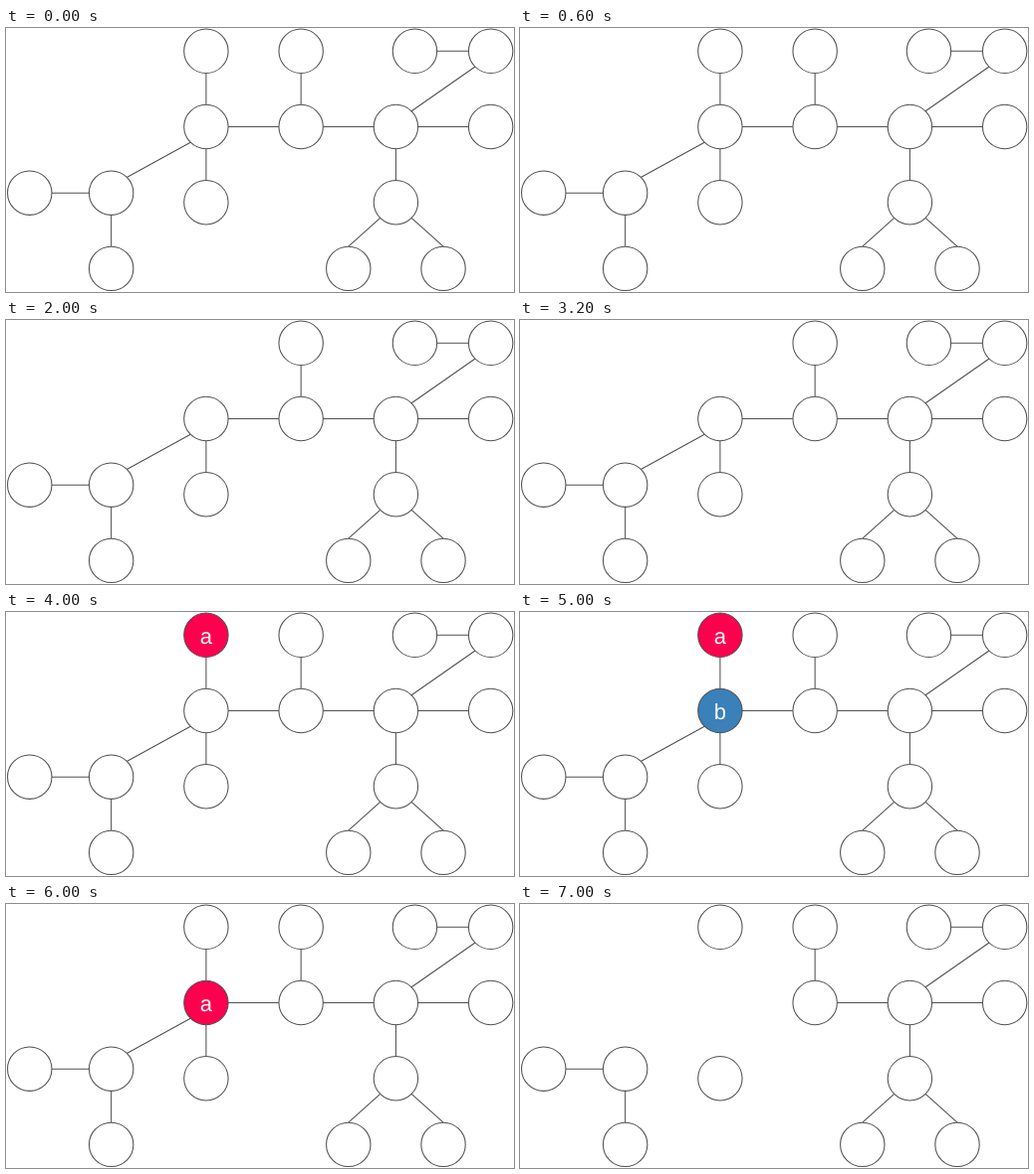
An HTML page for the animation above (8000 ms loop, 510 px wide and 266 px high).

```html
<!DOCTYPE html>
<html lang="en">
<head>
<meta charset="utf-8">
<title>Removing vertices from a tree</title>
<style>
  html, body { margin: 0; width: 100%; height: 100%; overflow: hidden; background: #fff; }
  svg { display: block; width: 510px; height: 266px; }
  circle, line { fill: #fff; stroke: #505050; stroke-width: 1.05; }
  text {
    font: 22px "Liberation Sans", Arial, sans-serif;
    fill: #fff; text-anchor: middle; text-rendering: geometricPrecision;
  }
</style>
</head>
<body>
<svg viewBox="0 0 510 266"></svg>
<script>
const R = 22.2, UNIT = 9.525, LOOP = 8000;

// A node sits a few grid units right of and below its parent.
const node = (dx, dy, ...children) => ({ dx, dy, children });
const leaf = node(0, -8);
const hub = node(0, 0,
  leaf,
  node(0, 8),
  node(-10, 7, node(-8.6, 0), node(0, 8)),
  node(10, 0,
    node(0, -8),
    node(10, 0,
      node(10, 0),
      node(10, -8, node(-8, 0)),
      node(0, 8, node(-5, 7), node(5, 7)))));

const nodes = [];
function place(n, x, y, parent) {
  Object.assign(n, { x, y, parent });
  nodes.push(n);
  n.children.forEach(c => place(c, x + c.dx * UNIT, y + c.dy * UNIT, n));
}
place(hub, 200.9, 99.5);

const red = '#ff004f', blue = '#3a80b9';
const mark = (on, label, fill) => ({ on, label, fill });
const a = mark(leaf, 'a', red), b = mark(hub, 'b', blue);
const scenes = [
  { at: 0 },
  { at: 1000, marks: [a] },
  { at: 2000, gone: leaf },
  { at: 4000, marks: [a] },
  { at: 5000, marks: [a, b] },
  { at: 6000, marks: [mark(hub, 'a', red)] },
  { at: 7000, gone: hub }
];

const svg = document.querySelector('svg');

function add(tag, attrs) {
  const el = document.createElementNS('http://www.w3.org/2000/svg', tag);
  for (const key in attrs) el.setAttribute(key, attrs[key]);
  return svg.appendChild(el);
}

function rim(n, angle) {
  return [n.x + R * Math.cos(angle), n.y + R * Math.sin(angle)];
}

// Edges leave at the nearest eighth-turn; steep ones arrive vertically.
function drawEdge(n) {
  const { dx, dy, parent } = n, eighth = Math.PI / 4;
  const out = Math.round(Math.atan2(dy, dx) / eighth) * eighth;
  const steep = Math.abs(dy) > Math.abs(dx);
  const into = steep ? -Math.sign(dy) * Math.PI / 2 : out + Math.PI;
  const [x1, y1] = rim(parent, out), [x2, y2] = rim(n, into);
  add('line', { x1, y1, x2, y2 });
}

function draw({ marks = [], gone }) {
  svg.replaceChildren();
  for (const n of nodes) {
    if (n === gone) continue;
    if (n.parent && n.parent !== gone) drawEdge(n);
    const circle = add('circle', { cx: n.x, cy: n.y, r: R });
    const m = marks.find(m => m.on === n);
    if (!m) continue;
    circle.style.fill = m.fill;
    add('text', { x: n.x, y: n.y + 8.4 }).textContent = m.label;
  }
}

let shown;
const start = performance.now();
function tick() {
  const t = (performance.now() - start) % LOOP;
  const scene = scenes.findLast(s => s.at <= t);
  if (scene !== shown) draw(shown = scene);
  requestAnimationFrame(tick);
}
tick();
</script>
</body>
</html>
```
